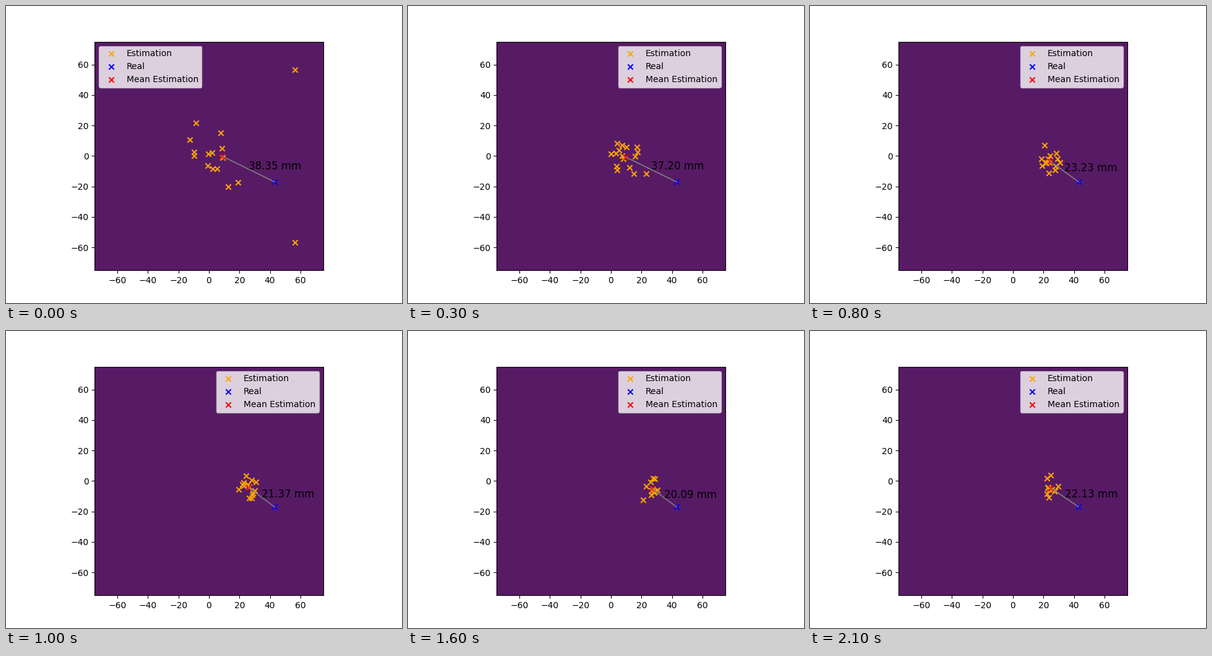
A matplotlib script for the animation above (2.2 s loop, 640 px wide and 480 px high).

```python
import numpy as np
import matplotlib.pyplot as plt
from matplotlib.animation import FuncAnimation

FRAMES, STEP_MS, COUNT = 22, 100, 16
REAL = np.array([43.1, -17.0])
OUTLIER = 80 / np.sqrt(2)

# Key points of the mean estimate: step, x and distance to REAL
KEY_STEPS = [0, 3, 6, 8, 12, 16, 21]
KEY_X = [8.65, 9.65, 21.6, 24.3, 27.5, 26.9, 24.8]
KEY_DIST = [38.35, 37.20, 25.69, 23.23, 19.51, 20.09, 22.13]


def mean_at(step):
    x = np.interp(step, KEY_STEPS, KEY_X)
    dist = np.interp(step, KEY_STEPS, KEY_DIST)
    y = REAL[1] + np.sqrt(dist ** 2 - (REAL[0] - x) ** 2)
    return np.array([x, y]), dist


def spread_at(step):
    """The cloud narrows, more in x than in y."""
    return np.array([2.2 + 7.5 * np.exp(-step / 5), 4 + 6.5 * np.exp(-step / 3)])


def build_clouds():
    """Particles wander around the mean while the filter drops the weak ones."""
    rng = np.random.default_rng(4)
    shape = rng.normal(size=(COUNT, 2))
    clouds = []
    for step in range(FRAMES):
        unit = shape[:COUNT - step // 4]
        unit = (unit - unit.mean(axis=0)) / unit.std(axis=0)
        mean, _ = mean_at(step)
        cloud = mean + unit * spread_at(step)
        if step == 0:
            cloud[:2] = [[OUTLIER, OUTLIER], [OUTLIER, -OUTLIER]]
            cloud[2:] += (COUNT * mean - cloud.sum(axis=0)) / (COUNT - 2)
        clouds.append(cloud)
        shape = 0.85 * shape + 0.5 * rng.normal(size=shape.shape)
    return clouds


clouds = build_clouds()

fig, ax = plt.subplots(figsize=(6.4, 4.8), dpi=100)
ax.imshow(np.zeros((150, 150)), extent=(-75, 75, -75, 75), alpha=0.9)
ticks = range(-60, 61, 20)
ax.set(xticks=ticks, yticks=ticks)


def crosses(color, name, x=(), y=()):
    return ax.scatter(x, y, marker="x", color=color, label=name)


particles = crosses("orange", "Estimation")
crosses("blue", "Real", *REAL)
center = crosses("red", "Mean Estimation")
link, = ax.plot([], [], color="gray", linewidth=1.2)
label = ax.text(0, 0, "", fontsize=12)
legend = ax.legend(loc="upper left")
ax.set(xlim=(-75, 75), ylim=(-75, 75))


def update(step):
    mean, dist = mean_at(step)
    particles.set_offsets(clouds[step])
    center.set_offsets([mean])
    link.set_data(*zip(mean, REAL))
    label.set_position((mean + REAL) / 2)
    label.set_text(f"{dist:.2f} mm")
    legend.set_loc("upper left" if step == 0 else "upper right")
    return particles, center, link, label, legend


anim = FuncAnimation(fig, update, frames=FRAMES, interval=STEP_MS,
                     repeat=True, repeat_delay=0, blit=False)
plt.show()
```
